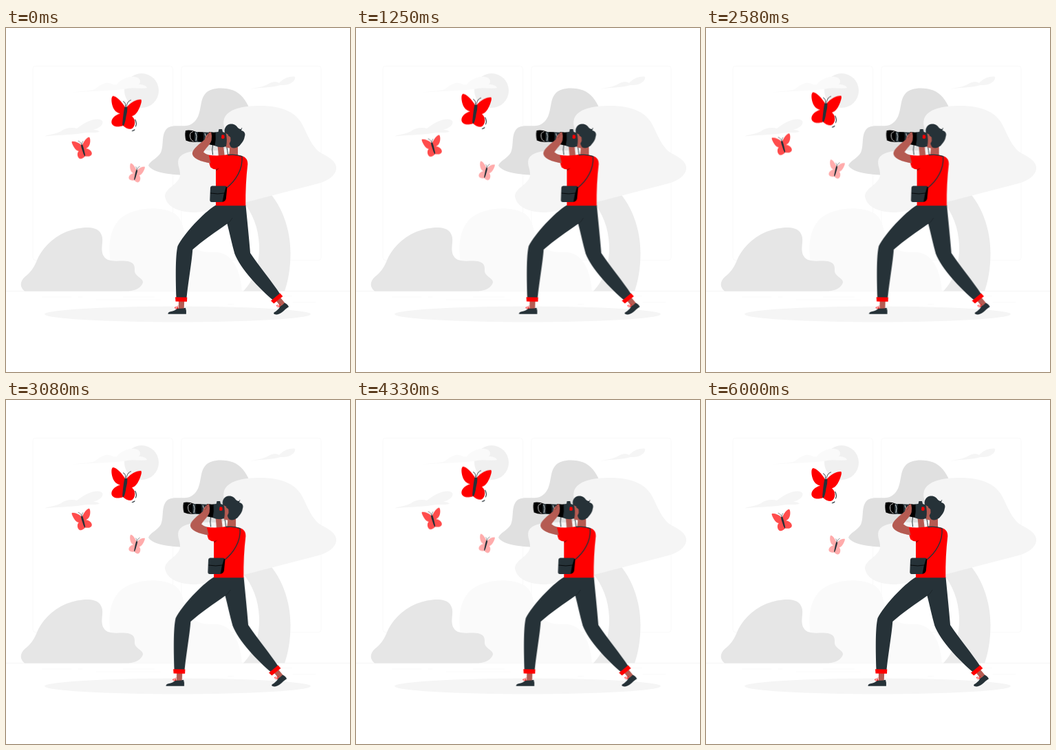
Write an HTML page that moves like this. It is 500 px wide and 500 px high and loops after 6040 ms.

```html
<!DOCTYPE html>
<html lang="en">
<head>
<meta charset="utf-8">
<title>Photographing butterflies</title>
<style>
  html, body { margin: 0; width: 100%; height: 100%; overflow: hidden; background: #fff; }
  svg { display: block; width: 100%; height: 100%; }
  .ink { fill: #263238; }
  .red { fill: #f00; }
  .skin { fill: #b55b52; }
  .line { fill: none; stroke: #263238; stroke-linecap: round; }
  .person { animation: shake 6040ms linear infinite; }
  .flight { animation: flutter 6040ms linear infinite; }

  /* 6 s of motion, then a 40 ms rest */
  @keyframes shake {
    0%, 99.338%, 100% { transform: translateX(0); }
    9.934%, 89.404% { transform: translateX(-1px); }
    19.868%, 79.47% { transform: translateX(2px); }
    29.801%, 49.669%, 69.536% { transform: translateX(-4px); }
    39.735%, 59.603% { transform: translateX(4px); }
  }
  @keyframes flutter {
    0%, 24.834%, 49.669%, 74.503%, 99.338%, 100% { transform: translateY(0); }
    12.417%, 37.252%, 62.086%, 86.921% { transform: translateY(-10px); }
  }
</style>
</head>
<body>
<svg viewBox="0 0 500 500">
  <defs>
    <g id="butterfly">
      <path class="red" d="M173 115C168 107 161 99.500 155.500 99C152.500 100 153 108 155 114C157 120 161 123.500 166 124.500C159 126.500 153.500 131 153.300 137C153.500 142 159 144 164 143.500C166 143.300 168 143 170 142C173 145 177 147 181 147C186 146 188 140 187 135C186.500 132 185 130 183 128.500C189 126.500 192 121 194.500 115C196.500 110 198 105 196 104C189 104 181 108.500 175.500 115Z"/>
      <g fill-opacity="1">
        <path class="ink" d="M172.300 115.500Q174.500 113.500 176.500 115.500Q176.600 121 174.500 129Q173.300 138 171 142Q168.800 143 169.300 138Q170.500 124 172.300 115.500Z"/>
        <path class="line" stroke-width=".9" d="M173.500 114C174 110 173 108 170.500 107M175 114C176 109 178 106 181.500 105"/>
      </g>
    </g>
  </defs>

  <!-- windows and floor -->
  <g fill="none" stroke="#f8f8f8" stroke-width=".8">
    <rect x="39" y="55.300" width="203.500" height="282.300" rx="4"/>
    <rect x="255" y="55.300" width="203" height="282.300" rx="4"/>
  </g>
  <path stroke="#ebebeb" stroke-width=".5" d="M0 382.400H500"/>
  <path stroke="#ebebeb" stroke-width=".25" d="M417 398.500h33M322 401.300h9M397 389.300h19M52 391h43M105 391h6M131 395.200h94M170 391h46"/>

  <!-- sky -->
  <circle cx="197" cy="91" r="25" fill="#f0f0f0"/>
  <path fill="#fafafa" d="M95 93.500C108 92 120 92 129 89C136 84 142 79 149 80C154 80 157 84 161 82C167 75 177 70 187 71C195 72 197 78 193 82C199 82 204 84 205 87C197 89 186 86 176 88C160 91 140 91 126 92C114 92 105 94 95 93.500Z"/>
  <path fill="#f5f5f5" d="M56 157.500C64 154 74 154 80 150C86 145 96 144 103 146C111 140 121 133 132 132.500C139 132 143 136 139 141C136 145 130 147 127 148C131 148 135 149 136 151C127 153 119 151 110 153C94 156 74 155 56 157.500Z"/>
  <path fill="#f5f5f5" d="M355 89C364 86 374 86 380 82C386 78 392 77 397 80C402 74 410 70 419 70.500C422 72 419 77 416 79C411 83 404 83 399 83C386 87 370 86 355 89Z"/>

  <!-- tree and bushes -->
  <path fill="#ebebeb" d="M335 236L380 236C401 258 413.500 292 413.500 327C413.500 350 410 368 405 382.400H345C361 366 369 342 368 316C367 290 358 268 344 252Z"/>
  <path fill="#e0e0e0" d="M207 200C209 193 221 189 225 181C230 170 225 155 234 146C243 139 258 145 268 140.500C287 131 279 107 290 95C299 85.500 318 86.500 330 90.500C342 95 350 107 354 118L335 180L260 214C240 213 214 211 207 200Z"/>
  <path fill="#f5f5f5" d="M317 132C322 118 343 113 370 113C398 113 420 121 430 139C438 154 442 168 454 179C464 186 478 190 480 202C481 213 469 222 454 226L350 253C327 258 300 266 276 268C252 268 234 261 231 245C231 232 251 228 253 214C254 204 246 196 253 187C261 178 282 177 303 178C321 178 326 172 323 160C320 150 314 143 317 132Z"/>
  <path fill="#fafafa" d="M153 345C147 315 151 288 170 274C190 260 224 259 242 268C259 277 256 293 264 308C272 322 283 326 300 326C325 324 340 345 343 382.400H170Z"/>
  <path fill="#e6e6e6" d="M27 382.400C19 376 21 368 27 362C36 355 40 349 44 340C51 322 66 305 88 296C107 289 128 287 136 296C142 303 140 311 139.500 318C139 325 140 333 148 337C158 340.500 169 337 179 339.500C188 342 187 349 187 354C189 362 200 364 199 370C197 377 188 382 178 382.400Z"/>
  <ellipse cx="249.500" cy="416" rx="193.500" ry="11.400" fill="#f5f5f5"/>

  <g class="person">
    <!-- legs and shoes -->
    <path class="skin" d="M251 396h8.200l-.5 12h-8ZM393 397l6-5 7 8.500-6.500 5Z"/>
    <path class="ink" d="M235.500 415.800Q235.300 413 239 412.300Q246 411 249 407.500Q255 408.500 261 406.800Q262.500 411 261.900 415.800ZM405 399.500Q409 401 411 405.300C405 409 401 415 395 416.300Q390 417 389 415Q389 413 392 412Q397 408 398.500 404.500Q402 403 405 399.500Z"/>
    <path fill="none" stroke="#f00" stroke-width=".8" d="M250 407.500q-5 1-4.500-1.500q2-1.500 4.500 1.500q-2-4 0-4M398 405q-5 1-4.500-2q2-1 4.500 2q-1-4 1-4"/>
    <path class="ink" d="M305 257.500C286 269 259 299 249.500 317C246 332 246.700 364 247.500 392H262.500C265.300 366 270 340 271.300 322C286 309 305 296 321.500 284.500C325.300 299 328.300 314 332.300 328C341 350 367 378 389.300 396.500L399 387.500C385.300 367 368.300 347 355 327C353.300 305 350.300 277 348.500 257.500Z"/>
    <path fill="none" stroke="#000" stroke-opacity=".35" stroke-width=".7" d="M321.500 284.500Q326 282 329 276"/>
    <path class="red" d="M246 391.300l17.300.2-.3 6.200-16.500-.2ZM385 396.500L398.300 385.500L402.300 390L389.300 400.500Z"/>

    <!-- far arm, neck and shirt -->
    <path class="skin" d="M307.500 170L316 171L318 188H309ZM325 165H337V187H323Q326 180 325 165Z"/>
    <path class="red" d="M294.300 184.500C304 186 314 185.500 323 183.700L341 185.500C348 187 351.500 191 351.300 198C349 217 348 237 348.300 258.200H305L305 205.500Q300 205 297.300 202.500C295 197 294.300 191 294.300 184.500Z"/>
    <path fill="#a00000" d="M305 205.500L310 203.500L305.500 208Z"/>
    <path class="line" stroke-width="1.300" d="M323 184.500Q334 183 343 186.700C344.500 205 334 222 320 233"/>
    <path class="line" stroke-width="1" d="M300.500 170Q299 177 300.500 184M320.500 171Q322 178 322.500 184"/>

    <!-- bag -->
    <path class="ink" d="M299.500 229.500H318.500Q321 230 320.500 232L318 241L316 251.500Q315 253 313 253H299Q296.300 253 296.300 250L297 232Q297.300 229.500 299.500 229.500Z"/>
    <path d="M320 230.500Q321.500 231 321.300 233L319.800 248Q319 252 314.500 252.800L316.800 241Z"/>
    <path fill="none" stroke="#000" stroke-width=".8" d="M297 240Q308 242 317.500 240"/>

    <!-- head -->
    <path class="skin" d="M318 151L330 151L332 174Q324 176 319.500 173Q317 167 318 151Z"/>
    <path class="ink" d="M318 152C316.500 146 320 140.500 326 139.500C332 139 335 142 337 145Q340 148 343 146.500Q342 148 342 149C347 150 348.500 154 346.800 158C346 164 342 168 339 171.500Q333 176 327.500 173.500Q324 170 324.500 164L323 155Z"/>
    <path class="line" stroke-width=".8" d="M338 147.500Q342 149 342.800 145.500"/>
    <path class="skin" d="M326.300 159Q322.500 154.500 318.500 159.500Q316 166 319.500 169.500Q324.500 170.500 326.500 164Z"/>

    <!-- camera -->
    <path d="M261 149Q268 147.500 276.500 151V165.500Q268 166.500 261.500 163.500Q259.500 156 261 149Z"/>
    <path class="ink" d="M274 151L305 152V167L274 165.500ZM303 151.500L308.500 151L309.500 147H314L315 151L319.500 152.500Q322 162 320 172Q312 175 303 171Z"/>
    <path d="M279 151.300L286.500 151.600Q288 158 286.500 165H279Q277.500 158 279 151.300ZM295 151L304.500 152Q305.500 162 303.500 171L294 169Z"/>
    <path fill="none" stroke="#fff" stroke-width=".8" d="M272 150.500Q267 151.500 267.500 157Q268 163.500 272.500 164.500M275.500 152Q278.500 157 276 164M289 153Q291.500 157 290 163"/>
    <path class="red" d="M313.500 155.500Q316 154.500 317.500 156.500V160Q315 162 313 160Z"/>

    <!-- near arm -->
    <path class="skin" d="M294.800 184.500Q289.500 183 287 180.500C291 174 297.500 168.500 298.700 163Q299.700 157 298.300 151.800Q296 150.300 294.300 153Q290 156.500 289 162C281 168.500 271.300 176 270.800 182C271 190 284 194.500 297.500 196.500Z"/>
    <path fill="none" stroke="#7d3a34" stroke-width=".6" d="M294.500 153Q295.500 157 292 160"/>
  </g>

  <g class="flight">
    <use href="#butterfly"/>
    <path class="line" stroke-width="1.100" d="M187.800 133.500Q190.500 139 188.500 143M183.300 149.700Q185.500 149.500 187 148"/>
    <use href="#butterfly" fill-opacity=".7" transform="translate(111 175) rotate(-7) scale(-.62 .62) translate(-174 -123)"/>
    <use href="#butterfly" fill-opacity=".33" transform="translate(190 211) rotate(6) scale(.5 .55) translate(-175 -123)"/>
  </g>
</svg>
</body>
</html>
```
